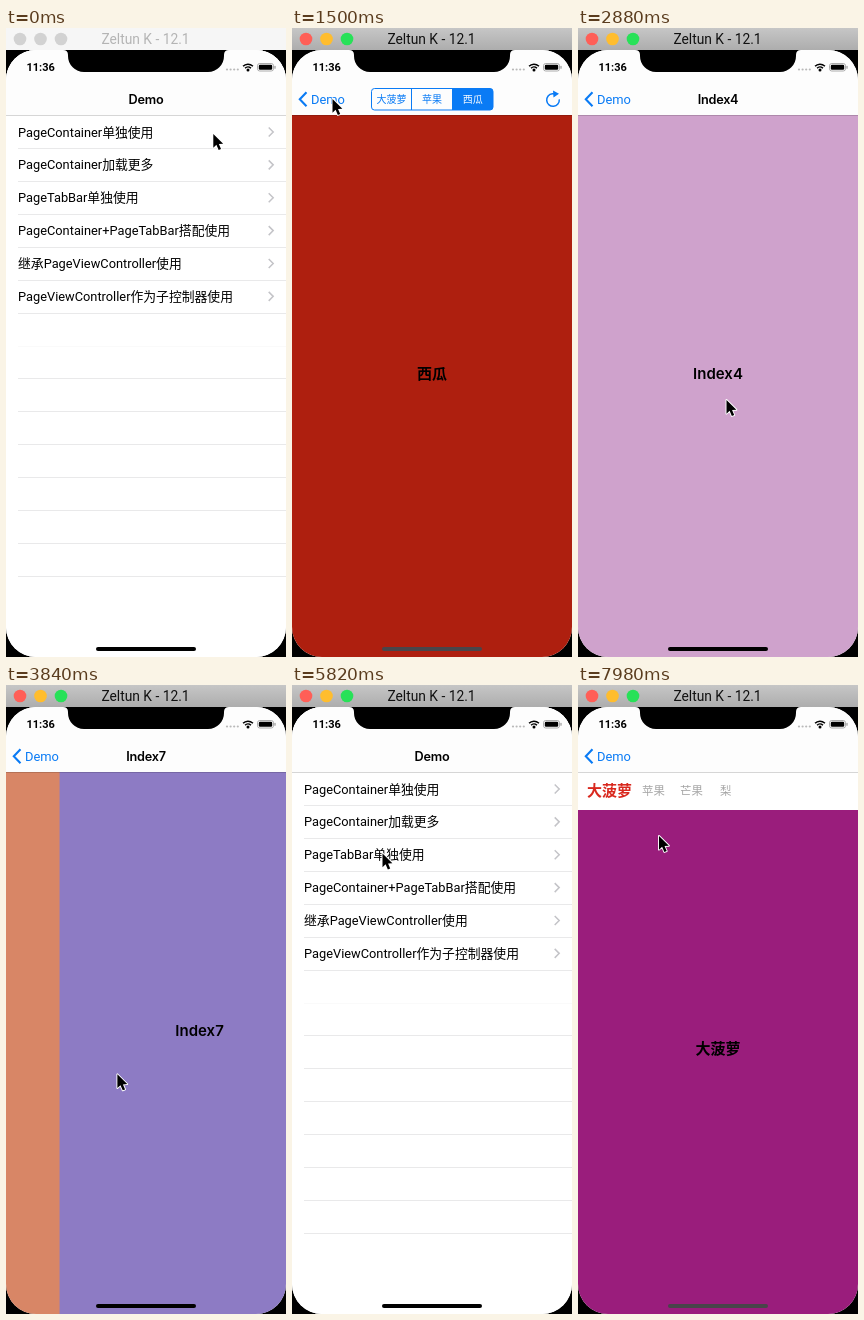
Write an HTML page with a canvas that moves like this. It is 280x629 px and loops after 8000 ms.

```html
<!DOCTYPE html>
<html lang="zh-CN">
<head>
<meta charset="utf-8">
<title>Demo</title>
<style>
html, body { margin: 0; width: 100%; height: 100%; overflow: hidden; background: #000; }
canvas { display: block; width: 280px; height: 629px; }
</style>
</head>
<body>
<canvas id="stage"></canvas>
<script>
const W = 280, H = 629, LOOP = 8000, STEP = 60, NAV = 87, ROW = 32.87;
const BLUE = '#0a7bf5', CJK = '"Noto Sans CJK SC", "Noto Sans CJK", sans-serif';
const PLAIN = 'Roboto, ' + CJK, TITLE = 'Inter, ' + CJK;
const canvas = document.getElementById('stage');
const c = canvas.getContext('2d');
const dpr = window.devicePixelRatio || 1;
canvas.width = W * dpr;
canvas.height = H * dpr;

const rows = ['PageContainer单独使用', 'PageContainer加载更多', 'PageTabBar单独使用',
  'PageContainer+PageTabBar搭配使用', '继承PageViewController使用', 'PageViewController作为子控制器使用'];
const fruits = ['大菠萝', '苹果', '西瓜'];
const fruitColors = ['#4d8fb3', '#68a852', '#ae1f0f'];
const indexColors = ['#74b894', '#d8ae62', '#718fd0', '#b9c955', '#cfa2cc',
  '#64b9ac', '#d88666', '#8d7bc4', '#a0c76b', '#0cceff', '#d2a84b'];

// Each visit: tapped row, push time, pop time.
const visits = [
  { row: 0, push: 300, pop: 1600, draw: drawSegments },
  { row: 1, push: 2020, pop: 5320, draw: drawIndexes },
  { row: 2, push: 5920, pop: Infinity, draw: drawTabs }
];
const SLIDE = 240;
const segmentTaps = [800, 1050];
const quickSwipes = [2210, 2365, 2520, 2675];
const slowSwipes = [2960, 3300, 3640, 3980, 4320, 4720];
const swipes = [...quickSwipes.map(at => ({ at, span: 145 })), ...slowSwipes.map(at => ({ at, span: 270 }))];

const drag = ({ at, span }) => [[at, 197, 399.5], [at + 20, 197, 399.5], [at + span * .6, 100, 388]];
const path = [
  [0, 207.3, 106], [240, 204, 106], [420, 204, 106], [760, 140, 71], [880, 140, 71],
  [1030, 181, 71], [1140, 181, 71], [1480, 40.5, 71], [1640, 40.5, 71], [1900, 100, 137], [2040, 100, 137],
  ...swipes.slice(0, 4).flatMap(drag), [2860, 148.5, 372], [2890, 148.5, 372],
  ...swipes.slice(4).flatMap(drag), [5220, 34, 71], [5360, 34, 71],
  [5760, 90.5, 168.5], [5940, 90.5, 168.5], [6400, 112, 132], [6960, 145, 101.5], [7080, 145, 101.5],
  [7800, 81, 151], [8000, 81, 151]
];
const presses = [
  ...[240, 800, 1050, 1560, 1960, 5270, 5860].map(at => [at, at + 100]),
  ...swipes.map(s => [s.at, s.at + s.span * .6])
];

const clamp = v => Math.max(0, Math.min(1, v));
const ease = v => { v = clamp(v); return v * v * (3 - 2 * v); };
const easeOut = v => 1 - (1 - clamp(v)) ** 3;

function rect(x, y, w, h, fill) {
  c.fillStyle = fill;
  c.fillRect(x, y, w, h);
}
function round(x, y, w, h, r, fill) {
  c.beginPath();
  c.roundRect(x, y, w, h, r);
  c.fillStyle = fill;
  c.fill();
}
function circle(x, y, r, fill) {
  c.beginPath();
  c.arc(x, y, r, 0, Math.PI * 2);
  c.fillStyle = fill;
  c.fill();
}
function line(points, color, width) {
  c.beginPath();
  points.forEach(([x, y]) => c.lineTo(x, y));
  c.strokeStyle = color;
  c.lineWidth = width;
  c.stroke();
}
function text(str, x, y, size, { color = '#000', weight = 400, family = PLAIN, align = 'left', spacing = 0 } = {}) {
  c.font = `${weight} ${size}px ${family}`;
  c.fillStyle = color;
  c.textAlign = align;
  c.letterSpacing = spacing + 'px';
  c.fillText(str, x, y + size * .36);
}
const navTitle = (str, x) =>
  text(str, x, 71, 12.7, { weight: 600, family: TITLE, align: 'center', spacing: -.25 });
const pageLabel = (str, x, y) =>
  text(str, x, y, 15, { weight: 600, family: TITLE, align: 'center' });

function shifted(dx, alpha, draw) {
  c.save();
  c.translate(dx, 0);
  c.globalAlpha *= alpha;
  draw();
  c.restore();
}

function drawList(t) {
  rect(0, 22, W, H - 22, '#fff');
  for (const { row, push, pop } of visits) {
    const glow = t < push - 40 ? 0 : t < pop ? 1 : 1 - clamp((t - pop) / SLIDE);
    if (glow) shifted(0, glow, () => rect(0, NAV + .5 + row * ROW, W, ROW, '#d9d9d9'));
  }
  for (let i = 1; i <= 14; i++) rect(12, Math.round(NAV + .5 + i * ROW), W - 12, 1, i === 7 ? '#fafafa' : '#e9e9ea');
  rows.forEach((label, i) => {
    const y = 104 + i * ROW;
    text(label, 12, y, 12.82);
    line([[262.7, y - 4.5], [267.2, y], [262.7, y + 4.5]], '#c4c4c8', 1.5);
  });
}

function drawPager(offset, colors, labels) {
  labels.forEach((label, i) => {
    const x = (i - offset) * W;
    if (Math.abs(x) >= W) return;
    rect(x, NAV, W + .5, H - NAV, colors[i]);
    pageLabel(label, x + W / 2, 345.5);
  });
}

const segmentOffset = t => segmentTaps.reduce((sum, at) => sum + easeOut((t - at) / 200), 0);
const indexOffset = t => swipes.reduce((sum, s) => sum + ease((t - s.at - 20) / (s.span - 20)), 0);

function drawSegments(t, part) {
  if (part === 'body') return drawPager(segmentOffset(t), fruitColors, fruits);
  const active = segmentTaps.filter(at => t >= at).length;
  const edges = [79.5, 119.5, 160.5, 201];
  c.save();
  c.beginPath();
  c.roundRect(79.5, 60.5, 121.5, 21.5, 3);
  c.clip();
  rect(edges[active], 60, edges[active + 1] - edges[active], 23, BLUE);
  c.restore();
  c.beginPath();
  c.roundRect(79.5, 60.5, 121.5, 21.5, 3);
  c.strokeStyle = BLUE;
  c.lineWidth = 1;
  c.stroke();
  fruits.forEach((label, i) => {
    if (i) line([[edges[i], 60], [edges[i], 82]], BLUE, 1);
    text(label, (edges[i] + edges[i + 1]) / 2, 71.3, 10, { color: i === active ? '#fff' : BLUE, align: 'center' });
  });
  c.beginPath();
  c.arc(261, 72, 6.3, -.1, Math.PI * 1.6);
  c.lineWidth = 1.5;
  c.stroke();
  c.beginPath();
  c.moveTo(261, 62.5);
  c.lineTo(267, 65.8);
  c.lineTo(261.5, 69.5);
  c.fillStyle = BLUE;
  c.fill();
}

function drawIndexes(t, part) {
  const offset = indexOffset(t);
  if (part === 'body') drawPager(offset, indexColors, indexColors.map((_, i) => 'Index' + i));
  else navTitle('Index' + Math.round(offset), W / 2);
}

function drawTabs(t, part) {
  if (part !== 'body') return;
  rect(0, NAV, W, 38, '#fff');
  rect(0, 125, W, H - 125, '#9a1d7c');
  text('大菠萝', 9, 106, 15, { color: '#d9281e', weight: 700 });
  [['苹果', 64], ['芒果', 102], ['梨', 142]].forEach(([s, x]) => text(s, x, 106, 11.4, { color: '#a6a6a6' }));
  pageLabel('大菠萝', W / 2, 364);
}

function drawStatus() {
  text('11:36', 20.5, 39, 11, { weight: 700 });
  for (let i = 0; i < 4; i++) circle(221 + i * 3.6, 41.5, 1.1, '#b9b9b9');
  c.strokeStyle = '#000';
  c.lineWidth = 1.5;
  for (const r of [4, 6.8]) {
    c.beginPath();
    c.arc(242, 43, r, -Math.PI * .76, -Math.PI * .24);
    c.stroke();
  }
  circle(242, 42, 1.5, '#000');
  c.beginPath();
  c.roundRect(251.5, 35.5, 16, 7.5, 2.2);
  c.strokeStyle = '#999';
  c.lineWidth = .8;
  c.stroke();
  round(252.8, 36.8, 13.4, 4.9, 1.2, '#000');
  round(268.4, 37.8, 1.2, 3, .6, '#999');
}

function drawNotch() {
  c.beginPath();
  c.moveTo(57, 22);
  c.quadraticCurveTo(62, 22, 62, 27);
  c.arcTo(62, 44, 78, 44, 16);
  c.lineTo(202, 44);
  c.arcTo(218, 44, 218, 28, 16);
  c.lineTo(218, 27);
  c.quadraticCurveTo(218, 22, 223, 22);
  c.fillStyle = '#000';
  c.fill();
}

function drawScreen(t) {
  const visit = visits.find(v => t >= v.push && t < v.pop + SLIDE);
  const p = visit ? easeOut((t - visit.push) / SLIDE) * (1 - easeOut((t - visit.pop) / SLIDE)) : 0;
  c.save();
  c.beginPath();
  c.roundRect(0, 22, W, H - 22, 30);
  c.clip();
  rect(0, 22, W, H - 22, '#fff');
  if (p < 1) shifted(-p * W * .3, 1, () => drawList(t));
  if (visit) shifted((1 - p) * W, 1, () => visit.draw(t, 'body'));

  rect(0, 22, W, NAV - 22, '#fdfdfd');
  rect(0, NAV, W, 1, 'rgba(0, 0, 0, .16)');
  if (p < 1) shifted(-p * 104, 1 - p, () => navTitle('Demo', W / 2));
  if (visit) {
    shifted(0, p, () => line([[14.5, 64.3], [7.8, 71.3], [14.5, 78.3]], BLUE, 2.1));
    shifted((1 - p) * 104, p, () => text('Demo', 19, 71.3, 12.9, { color: BLUE }));
    shifted((1 - p) * 90, p, () => visit.draw(t, 'nav'));
  }
  drawStatus();
  const dimmed = p > .5 && visit.draw !== drawIndexes;
  round(90, 619, 100, 4, 2, dimmed ? '#49454a' : '#000');
  c.restore();
  drawNotch();
}

function drawWindowBar(active) {
  const shade = c.createLinearGradient(0, 0, 0, 22);
  shade.addColorStop(0, active ? '#c6c6c6' : '#f6f6f6');
  shade.addColorStop(1, active ? '#adadad' : '#f6f6f6');
  rect(0, 0, W, 22, shade);
  ['#ff5f57', '#ffbd2e', '#28e158'].forEach((color, i) =>
    circle(14 + i * 20.5, 11, 6.3, active ? color : '#d2d2d2'));
  text('Zeltun K - 12.1', 139.5, 11, 13.8, { color: active ? '#111' : '#b4b4b4', align: 'center' });
}

function drawCursor(t) {
  const next = Math.max(1, path.findIndex(k => k[0] > t));
  const [t0, x0, y0] = path[next - 1], [t1, x1, y1] = path[next];
  const k = ease((t - t0) / (t1 - t0));
  c.save();
  c.translate(x0 + (x1 - x0) * k, y0 + (y1 - y0) * k);
  if (presses.some(([from, to]) => t >= from && t < to)) {
    c.beginPath();
    c.arc(.5, .8, 22, 0, Math.PI * 2);
    c.strokeStyle = 'rgba(255, 255, 255, .7)';
    c.lineWidth = 2.6;
    c.stroke();
    c.strokeStyle = '#000';
    c.lineWidth = 1.6;
    c.stroke();
  }
  c.scale(.94, .94);
  c.beginPath();
  [[0, 0], [0, 14.5], [3.3, 11.5], [5.7, 17], [8.2, 16], [5.9, 10.7], [10.5, 10.4]].forEach(([x, y]) => c.lineTo(x, y));
  c.closePath();
  c.lineJoin = 'round';
  c.strokeStyle = '#fff';
  c.lineWidth = 2;
  c.stroke();
  c.fillStyle = '#000';
  c.fill();
  c.restore();
}

function frame(now) {
  const t = Math.floor((now % LOOP) / STEP) * STEP;
  c.setTransform(dpr, 0, 0, dpr, 0, 0);
  rect(0, 0, W, H, '#000');
  drawWindowBar(t >= 240);
  drawScreen(t);
  drawCursor(t);
  requestAnimationFrame(frame);
}
requestAnimationFrame(frame);
</script>
</body>
</html>
```
